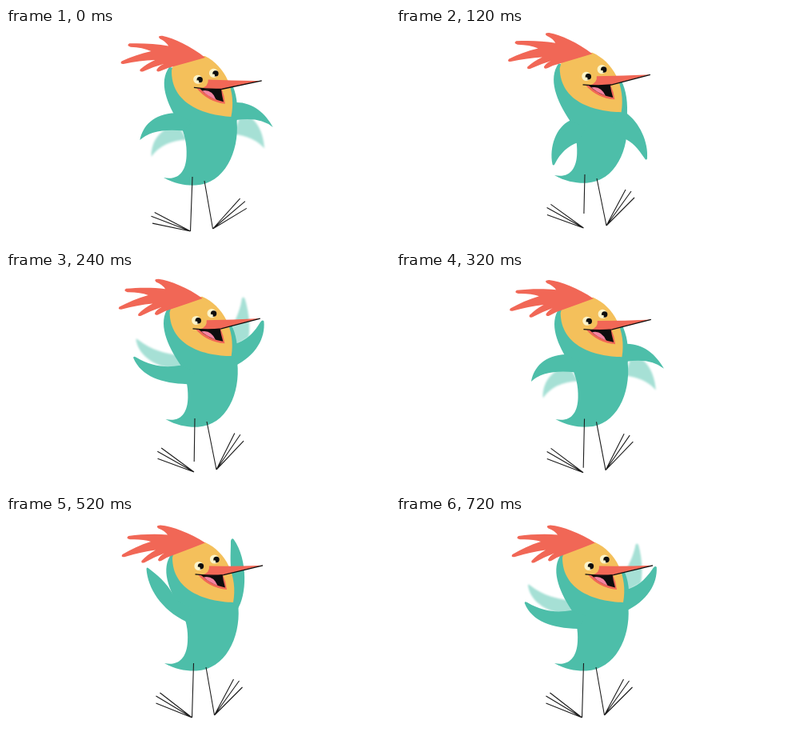
Animation of 480x270 px, one loop 760 ms. Source, as an HTML page:

```html
<!DOCTYPE html>
<html lang="en">
<head>
<meta charset="utf-8">
<title>Flapping bird</title>
<style>
  html, body { margin: 0; width: 100%; height: 100%; overflow: hidden; background: #fff; }
  svg { display: block; width: 100vw; height: 100vh; }
  .teal { fill: #4dbea9; }
  .red { fill: #f16756; }
  .cream { fill: #fcf4cb; }
  .ink { fill: #0d0d0d; }
  .line { fill: none; stroke: #1c1c1c; stroke-width: 1.1; }
</style>
</head>
<body>
<svg viewBox="0 0 480 270">
  <defs>
    <filter id="soft" x="-20%" y="-20%" width="140%" height="140%">
      <feGaussianBlur stdDeviation="0.9"/>
    </filter>
  </defs>
  <g id="body">
    <path id="smear" fill="#a6e0d5" filter="url(#soft)"/>
    <path class="teal" d="M207 47C193 66 203 92 219 117C225 129 228 143 227 157C226 176 217 188 198 184C212 192 226 194 238 193.500C274 192 293 152 290.500 115C292.500 95 291 80 284 66Z"/>
    <path id="wings" class="teal"/>
  </g>
  <g id="face">
    <path fill="#f4c05b" d="M249 33C275 45 290 75 284 108C250 107 208 94 208 52L212 38Z"/>
    <circle class="cream" cx="241" cy="62.500" r="5.600"/>
    <circle class="ink" cx="243.500" cy="62.800" r="3.700"/>
    <circle class="cream" cx="241" cy="65.200" r="1.700"/>
    <circle class="cream" cx="260.500" cy="54" r="5.600"/>
    <circle class="ink" cx="263" cy="54.500" r="3.700"/>
    <circle class="cream" cx="260.500" cy="56.900" r="1.700"/>
    <path class="red" d="M240 73.500Q254 90 276 92Q275 82 271 73Z"/>
    <path class="ink" d="M244 74L270.500 73Q271.500 81 274 89.500Q256 86 244 74Z"/>
    <path fill="#f583a0" d="M247 76.500Q259 74 264.500 87Q254 83 247 76.500Z"/>
    <path class="red" d="M254 62.500Q288 63 321 61.800L272 73.600Q258 75 245 73.800Q255 71 254 62.500Z"/>
    <path d="M236.500 72.800Q256 75 272 73.600L321 61.800" fill="none" stroke="#0d0d0d" stroke-width="1.300"/>
  </g>
  <path id="crest" class="red" d="M249 33.500C230 21 208 13 193 11.500Q186 12 190.500 15.500Q198 18 202 23.500C186 22 168 23 153 25Q149 28 155 29.300Q170 28.500 181 32C168 36 156 42 145.500 48Q143 51.500 148 51.200Q168 45 187 42.500Q177 48 169.500 56Q168.500 59.500 173 58.300Q186 51 198 46.500Q192 50 190 54.500Q190.500 58 195 55.500Q202 51 210 48.500Q230 41 249 33.500Z"/>
  <path id="legs" class="line"/>
  <path id="footL" class="line" d="M0 0L-40-31M0 0L-45-27M0 0L-45-18"/>
  <path id="footR" class="line" d="M0 0L24-45M0 0L31-43M0 0L35-35"/>
</svg>
<script>
const STEP = 40, STEPS = 19;
const times = [0, 120, 240, 400, 520];

// one value per entry of `times`
const keys = {
  headX: [-1.2, -3.2, -3.3, -1, 0],
  headY: [2, -2.2, -2.2, -0.5, 0],
  headA: [1.7, -1, -1.2, -0.3, 0],
  crestX: [0, -3.6, -3.3, -1, 0],
  crestY: [3.5, -1.2, -0.5, 0, 0],
  crestA: [5.5, 4.5, 2.2, 0.5, 0],
  neckX: [-2.5, -3, -3, -1, 0],
  tailX: [-1, 0, 1.5, 1, 0],
  tailY: [3, 0, 0, 0, 0],
  hipLX: [233, 236, 236, 235, 234.5],
  hipLY: [186, 183, 183, 184, 184],
  hipRX: [248, 251, 251, 250, 250],
  hipRY: [191, 188, 187, 188, 189],
  shinY: [254, 232, 237, 252, 252],
  footLX: [230.5, 234.5, 235, 233, 232.5],
  footLY: [254, 250, 250, 251.5, 252],
  footLA: [-10, -2, -1.5, -0.3, 0],
  footRX: [258.5, 263, 263, 261, 260.5],
  footRY: [251, 247, 247, 248.5, 249],
  footRA: [13.8, 0, -1.5, -0.5, 0]
};

// wing strokes: rising, high, falling, low
const flaps = [
  {
    wings: "M214 104C186 105 173 120 169 137.500Q186 122 224 126L235 115ZM288 91C310 90 326 104 335.500 121.500Q319 108 288 113Z",
    smear: "M216 118C190 125 183 143 183 158Q198 138 228 137ZM296 105C316 108 324 130 324.500 148Q312 133 286 130Z"
  },
  {
    wings: "M225 132C194 117 177 90 175.500 66Q176 63 179 66C195 78 204 88 212 104L235 118ZM289 117C301 100 303 55 284.500 29Q282 27 281 31C281 50 279 60 284 80L280 105Z",
    smear: ""
  },
  {
    wings: "M227 141C195 140 170 132 160.800 109Q160.500 106 164 108C184 120 202 121 219 118L238 125ZM287 119C314 106 327 85 325.800 64Q324 61.500 321.500 65C310 82 301 88 288 92Z",
    smear: "M222 124C190 122 168 108 165 87Q165 84 168 87C185 100 200 103 218 106ZM288 94L306 84C309 68 307 50 303 36Q301 33 299.500 36C297 48 293 58 285 72Z"
  },
  {
    wings: "M219 117C202 125 192 149 196 171Q197.500 173 199 170C206 157 216 148 228 144L240 125ZM289 107C306 119 317 143 314.500 164Q313 166.500 311 163C303 151 298 144 284 138L272 120Z",
    smear: ""
  }
];

const el = {};
document.querySelectorAll("[id]").forEach(n => el[n.id] = n);
const set = (id, name, value) => el[id].setAttribute(name, value);

const slope = (v, i, j) => (v[j] - v[i]) / (times[j] - times[i]);

// smooth curve through the key values, held after the last
function sample(v, t) {
  const last = times.length - 1;
  if (t >= times[last]) return v[last];
  let i = 0;
  while (t >= times[i + 1]) i++;
  const h = times[i + 1] - times[i], u = (t - times[i]) / h;
  const m0 = slope(v, Math.max(i - 1, 0), i + 1) * h;
  const m1 = i + 1 === last ? 0 : slope(v, i, i + 2) * h;
  const u2 = u * u, u3 = u2 * u;
  return v[i] * (2 * u3 - 3 * u2 + 1) + m0 * (u3 - 2 * u2 + u)
    + v[i + 1] * (3 * u2 - 2 * u3) + m1 * (u3 - u2);
}

const place = (id, x, y, a, px = 0, py = 0) =>
  set(id, "transform", `translate(${x} ${y}) rotate(${a} ${px} ${py})`);

function draw(step) {
  const t = step * STEP, p = {};
  for (const k in keys) p[k] = sample(keys[k], t);

  // lean the body between the tail (y 184) and the head (y 74)
  const kx = (p.neckX - p.tailX) / 110, ky = (p.headY - p.tailY) / 110;
  set("body", "transform",
    `matrix(1 0 ${-kx} ${1 - ky} ${p.tailX + kx * 184} ${p.tailY + ky * 184})`);

  const flap = flaps[step % 4];
  set("wings", "d", flap.wings);
  set("smear", "d", flap.smear);

  place("face", p.headX, p.headY, p.headA, 250, 60);
  place("crest", p.crestX, p.crestY, p.crestA, 249, 33);
  place("footL", p.footLX, p.footLY, p.footLA);
  place("footR", p.footRX, p.footRY, p.footRA);

  const shinX = p.hipLX + (p.footLX - p.hipLX) * (p.shinY - p.hipLY) / (p.footLY - p.hipLY);
  set("legs", "d", `M${p.hipLX} ${p.hipLY}L${shinX} ${p.shinY}M${p.hipRX} ${p.hipRY}L${p.footRX} ${p.footRY}`);
}

const start = performance.now();
function tick() {
  draw(Math.floor((performance.now() - start) / STEP) % STEPS);
  requestAnimationFrame(tick);
}
tick();
</script>
</body>
</html>
```
